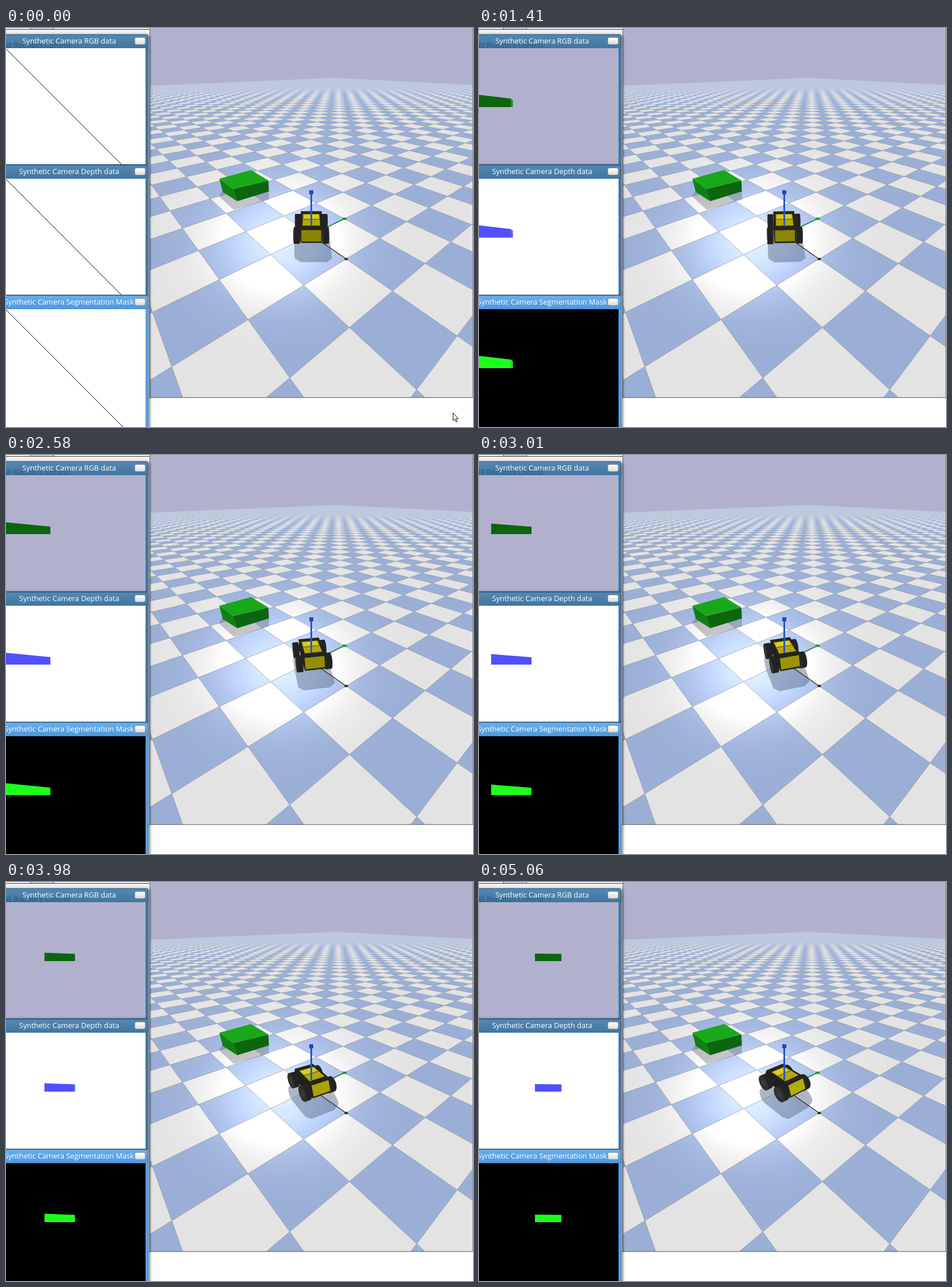
An HTML page with a canvas that plays this animation: 810 by 691 pixels, repeating every 5120 ms.

```html
<!DOCTYPE html>
<html lang="en">
<head>
<meta charset="utf-8">
<title>Robot camera simulation</title>
<style>
  html, body { margin: 0; width: 100%; height: 100%; overflow: hidden; background: #fff; }
  #stage { position: relative; width: 810px; height: 691px; overflow: hidden; background: #fff; }
  canvas, svg { position: absolute; left: 0; top: 0; display: block; }
  .back { position: absolute; left: 0; top: 0; width: 250px; height: 640px; background: #f3f3f5; border-right: 1px solid #667; box-sizing: border-box; }
  .back::before { content: ""; position: absolute; left: 0; right: 0; top: 2px; height: 1px; background: #444; }
  .back::after { content: ""; position: absolute; left: 42px; top: 0; width: 39px; height: 2px; background: #cfcfd8; border: solid #444; border-width: 0 1px 1px; }
  .win { position: absolute; left: -6px; width: 253px; height: 226px; background: #4177a6; border-radius: 0 5px 0 0; box-shadow: 2px 1px 4px 1px rgba(0, 0, 0, .45); }
  .win.active { background: #559ee2; height: 240px; }
  .bar { position: absolute; left: 0; right: 0; top: 0; height: 24px; box-sizing: border-box; border-top: 1px solid #2d5478; border-right: 1px solid #2d5478; border-radius: 0 5px 0 0; background: linear-gradient(#5388b4, #41759f); }
  .active .bar { border-color: #4079ad; background: linear-gradient(#69aeee, #4c97dc); }
  .bar span { position: absolute; left: 115.5px; top: 1px; transform: translateX(-50%); white-space: nowrap; color: #fff; font: 12.75px/19px "Open Sans", "Noto Sans", sans-serif; }
  .bar .ghost { left: 5px; top: 8px; transform: none; color: rgba(22, 60, 98, .55); }
  .bar i { position: absolute; left: 229px; top: 4px; width: 17px; height: 11px; border: 1px solid #999; border-radius: 3px; background: linear-gradient(#fff, #d9dbe0); }
  .view { position: absolute; left: 6px; top: 24px; width: 242px; height: 201px; overflow: hidden; background: #fff; }
  .active .view { height: 216px; }
</style>
</head>
<body>
<div id="stage">
  <canvas id="scene" width="810" height="691"></canvas>
  <div class="back"></div>
  <svg id="cursor" width="810" height="691"><path d="M775.5 666.5v13.5l3-2.8 2.2 5.3 2-.9-2.2-5.1h4.2z" fill="#fff" stroke="#111"/></svg>
</div>
<script>
const LOOP = 5120, VIEW_START = 880, CURSOR_END = 30;
const stage = document.getElementById("stage");
const cursor = document.getElementById("cursor");
const ctx = document.getElementById("scene").getContext("2d");
const clamp = (v, lo = 0, hi = 1) => Math.min(hi, Math.max(lo, v));
const rad = deg => deg * Math.PI / 180;

// Camera windows
function addWindow(top, title, background, fill, extra = "", active = false) {
  const win = document.createElement("div");
  win.className = active ? "win active" : "win";
  win.style.top = top + "px";
  win.innerHTML = `<div class="bar">${extra}<span>${title}</span><i></i></div>
    <div class="view"><svg width="242" height="216">
      <line x1="0" y1="1" x2="215" y2="216" stroke="#111"/>
      <g><rect width="242" height="216" fill="${background}"/><polygon class="side"/><polygon class="front" fill="${fill}"/></g>
    </svg></div>`;
  stage.insertBefore(win, cursor);
  return {
    group: win.querySelector("g"),
    side: win.querySelector(".side"),
    front: win.querySelector(".front"),
    sideFill: fill === "#0d650f" ? "#159017" : fill
  };
}
const views = [
  addWindow(11, "Synthetic Camera RGB data", "#b1b1cd", "#0d650f", '<span class="ghost">⊟ Robotics Control</span>'),
  addWindow(237, "Synthetic Camera Depth data", "#fff", "#5050ff"),
  addWindow(463, "Synthetic Camera Segmentation Mask", "#000", "#1eff1e", "", true)
];

// time, left, right, top left, top right, width of the side face
const KEYS = [
  [880, -60, 54, 73, 87, 4],
  [1900, -40, 63, 77, 87.5, 2.5],
  [2580, -5, 77, 81, 89, 0],
  [3440, 47, 105, 86.5, 89.5, 0],
  [4510, 86, 134, 88.5, 89.5, 0],
  [5060, 97, 143, 89, 89.5, 0]
];
function sample(t) {
  t = clamp(t, KEYS[0][0], KEYS[5][0]);
  const i = Math.max(1, KEYS.findIndex(k => k[0] >= t));
  const p = KEYS[i - 1], q = KEYS[i], s = (t - p[0]) / (q[0] - p[0]);
  return p.map((v, j) => v + (q[j] - v) * s);
}
function drawViews(t, [, left, right, topL, topR, side]) {
  const edge = right - side, bottom = 102;
  for (const v of views) {
    v.group.style.display = t < VIEW_START ? "none" : "";
    v.front.setAttribute("points", `${left},${topL} ${edge},${topR} ${edge},${bottom} ${left},${bottom}`);
    v.side.setAttribute("points", `${edge},${topR} ${right},${topR + side} ${right},${bottom} ${edge},${bottom}`);
    v.side.setAttribute("fill", v.sideFill);
  }
}

// Orbit camera aimed at the world origin
const CX = 529.5, CY = 358.2, SCALE = 82.45, DIST = 5.035;
const YAW_SIN = Math.sin(rad(50)), YAW_COS = Math.cos(rad(50));
const PITCH_SIN = Math.sin(rad(35.45)), PITCH_COS = Math.cos(rad(35.45));

function depth(u, v, z = 0) {
  return 1 - ((YAW_SIN * u - YAW_COS * v) * PITCH_COS + z * PITCH_SIN) / DIST;
}
function project(u, v, z = 0) {
  const k = SCALE / depth(u, v, z);
  const near = YAW_SIN * u - YAW_COS * v, right = YAW_COS * u + YAW_SIN * v;
  return [CX + right * k, CY + (near * PITCH_SIN - z * PITCH_COS) * k];
}
function poly(c, pts, fill) {
  c.beginPath();
  pts.forEach(p => c.lineTo(p[0], p[1]));
  c.closePath();
  c.fillStyle = fill;
  c.fill();
}
function line(c, p, q, color, width) {
  c.beginPath();
  c.moveTo(p[0], p[1]);
  c.lineTo(q[0], q[1]);
  c.strokeStyle = color;
  c.lineWidth = width;
  c.stroke();
}

const SKY = [177, 177, 205], WHITE = [227, 227, 227], BLUE = [155, 175, 214];
function floorColor(x, y) {
  const sy = (y - CY) / SCALE, slope = PITCH_SIN + sy * PITCH_COS / DIST;
  if (slope <= 0) return SKY;
  const near = sy / slope, w = 1 - near * PITCH_COS / DIST;
  const right = (x - CX) / SCALE * w;
  const u = right * YAW_COS + near * YAW_SIN, v = right * YAW_SIN - near * YAW_COS;
  if (Math.abs(u) > 50 || Math.abs(v) > 50) return SKY;
  const contrast = clamp((7.2 - w) / 1.8) / 2;
  const mix = .5 + ((Math.floor(u) + Math.floor(v)) & 1 ? contrast : -contrast);
  const shine = 66 * Math.exp(-(((x - 475) / 108) ** 2) - ((y - 370) / 92) ** 2);
  return WHITE.map((n, i) => Math.min(255, n + (BLUE[i] - n) * mix + shine));
}
function makeBackdrop() {
  const cv = document.createElement("canvas");
  cv.width = 810;
  cv.height = 691;
  const c = cv.getContext("2d"), x0 = 240, width = 570, height = 640, n = 3;
  const img = c.createImageData(width, height);
  for (let y = 0, o = 0; y < height; y++) {
    const sub = y > 70 ? n : 1;
    for (let x = 0; x < width; x++, o += 4) {
      const sum = [0, 0, 0];
      for (let k = 0; k < sub * sub; k++) {
        const col = floorColor(x0 + x + (k % sub + .5) / sub, y + (Math.floor(k / sub) + .5) / sub);
        for (let i = 0; i < 3; i++) sum[i] += col[i];
      }
      for (let i = 0; i < 3; i++) img.data[o + i] = sum[i] / (sub * sub);
      img.data[o + 3] = 255;
    }
  }
  c.fillStyle = "#fff";
  c.fillRect(0, 0, 810, 691);
  c.putImageData(img, x0, 0);

  c.save();
  c.beginPath();
  c.rect(x0, 0, width, height);
  c.clip();
  for (let u = -30; u < 8; u++) for (let v = -8; v < 30; v++) {
    const w = depth(u, v);
    if (w < .2 || w > 5) continue;
    c.globalAlpha = clamp(.75 - w * .15);
    const p = project(u, v);
    line(c, p, project(u + 1, v), "#85878c", 1);
    line(c, p, project(u, v + 1), "#85878c", 1);
  }
  c.restore();

  poly(c, [[376, 281], [369, 291], [395, 315], [456, 297], [456, 280]], "rgba(95,95,105,.36)");
  const A = [370, 261], B = [425, 246], C = [455, 264], D = [394, 279], E = [456, 283], F = [401, 300], G = [376, 284];
  poly(c, [A, D, F, G], "#118014");
  poly(c, [D, C, E, F], "#0d650f");
  poly(c, [A, B, C, D], "#1aa81b");
  line(c, [240, 640], [810, 640], "#555", 1);
  line(c, [809.5, 0], [809.5, 640], "#8a8a96", 1);
  return cv;
}
const backdrop = makeBackdrop();

function hull(pts) {
  pts.sort((p, q) => p[0] - q[0] || p[1] - q[1]);
  const half = list => {
    const out = [];
    for (const p of list) {
      while (out.length > 1) {
        const [a, b] = out.slice(-2);
        if ((b[0] - a[0]) * (p[1] - a[1]) - (b[1] - a[1]) * (p[0] - a[0]) > 0) break;
        out.pop();
      }
      out.push(p);
    }
    return out.slice(0, -1);
  };
  return [...half(pts), ...half([...pts].reverse())];
}

const RADIUS = .165, AXLE = .256, TRACK = .285, HALF_TYRE = .057;
function ring(f, s, r) {
  return Array.from({ length: 24 }, (_, i) => {
    const a = i * Math.PI / 12;
    return [f + r * Math.cos(a), s, RADIUS + r * Math.sin(a)];
  });
}

// f runs towards the viewer's end of the robot, s to its right on screen
function drawRobot(yaw) {
  const cos = Math.cos(yaw), sin = Math.sin(yaw);
  const world = ([f, s, z]) => [f * cos - s * sin, f * sin + s * cos, z];
  const at = p => project(...world(p));
  const cast = p => {
    const [u, v, z] = world(p);
    return project(u + 1.12 * z, v - .77 * z);
  };
  const face = (pts, fill) => poly(ctx, pts.map(at), fill);
  const flat = (f1, f2, s, z, fill) => face([[f1, -s, z], [f1, s, z], [f2, s, z], [f2, -s, z]], fill);
  const wheel = (f, s) => {
    const inner = ring(f, s + HALF_TYRE, RADIUS), outer = ring(f, s - HALF_TYRE, RADIUS);
    poly(ctx, hull([...inner, ...outer].map(at)), "#232323");
    face(outer, "#303030");
    face(ring(f, s - HALF_TYRE, .075), "#3b3b3b");
  };

  const outline = [];
  for (const s of [-.34, .34]) for (const f of [-AXLE, AXLE]) outline.push(...ring(f, s, RADIUS));
  for (const s of [-.24, .24]) for (const f of [-.33, .33]) outline.push([f, s, .385]);
  poly(ctx, hull(outline.map(cast)), "rgba(82,98,128,.46)");

  const origin = project(0, 0), xEnd = project(1, 0), yEnd = project(0, 1);
  line(ctx, origin, xEnd, "#3a3728", 1.4);
  line(ctx, origin, yEnd, "#2b8a4a", 2);
  ctx.fillStyle = "#3a3728";
  ctx.fillRect(xEnd[0] - 3, xEnd[1] - 2, 6, 4);
  ctx.fillStyle = "#149a2c";
  ctx.fillRect(yEnd[0] - 3, yEnd[1] - 2, 7, 4);

  wheel(-AXLE, TRACK);
  wheel(AXLE, TRACK);
  face([[-.4, -.2, .1], [.4, -.2, .1], [.42, -.2, .15], [.33, -.2, .38], [-.33, -.2, .38], [-.42, -.2, .15]], "#1f1f1f");
  face([[.4, -.2, .09], [.4, .2, .09], [.43, .2, .16], [.43, -.2, .16]], "#26251c");
  face([[.43, -.21, .14], [.43, .21, .14], [.33, .22, .39], [.33, -.22, .39]], "#25241a");
  const glow = clamp((yaw + rad(40)) / rad(40));
  const panel = `rgb(${138 + 42 * glow},${131 + 40 * glow},${4 + 8 * glow})`;
  face([[.43, -.19, .15], [.43, .19, .15], [.345, .19, .355], [.345, -.19, .355]], panel);
  flat(-.32, .34, .22, .385, "#26251b");
  flat(-.2, .235, .17, .385, "#b5a70e");
  flat(-.18, -.03, .15, .385, "#d9cc2a");
  line(ctx, at([.01, -.17, .385]), at([.01, .17, .385]), "#6d650e", 1);
  wheel(-AXLE, -TRACK);
  wheel(AXLE, -TRACK);

  ctx.fillStyle = "#2b56c4";
  ctx.fillRect(528, 287, 3, 56);
  ctx.fillStyle = "#2148b4";
  ctx.fillRect(526, 281, 7, 7);
}

function frame() {
  const t = performance.now() % LOOP, pose = sample(t);
  ctx.drawImage(backdrop, 0, 0);
  // The robot turns as far as the box slides across its camera
  drawRobot(rad(-40 + (pose[2] - KEYS[0][2]) * .45));
  drawViews(t, pose);
  cursor.style.display = t < CURSOR_END ? "" : "none";
  requestAnimationFrame(frame);
}
frame();
</script>
</body>
</html>
```
